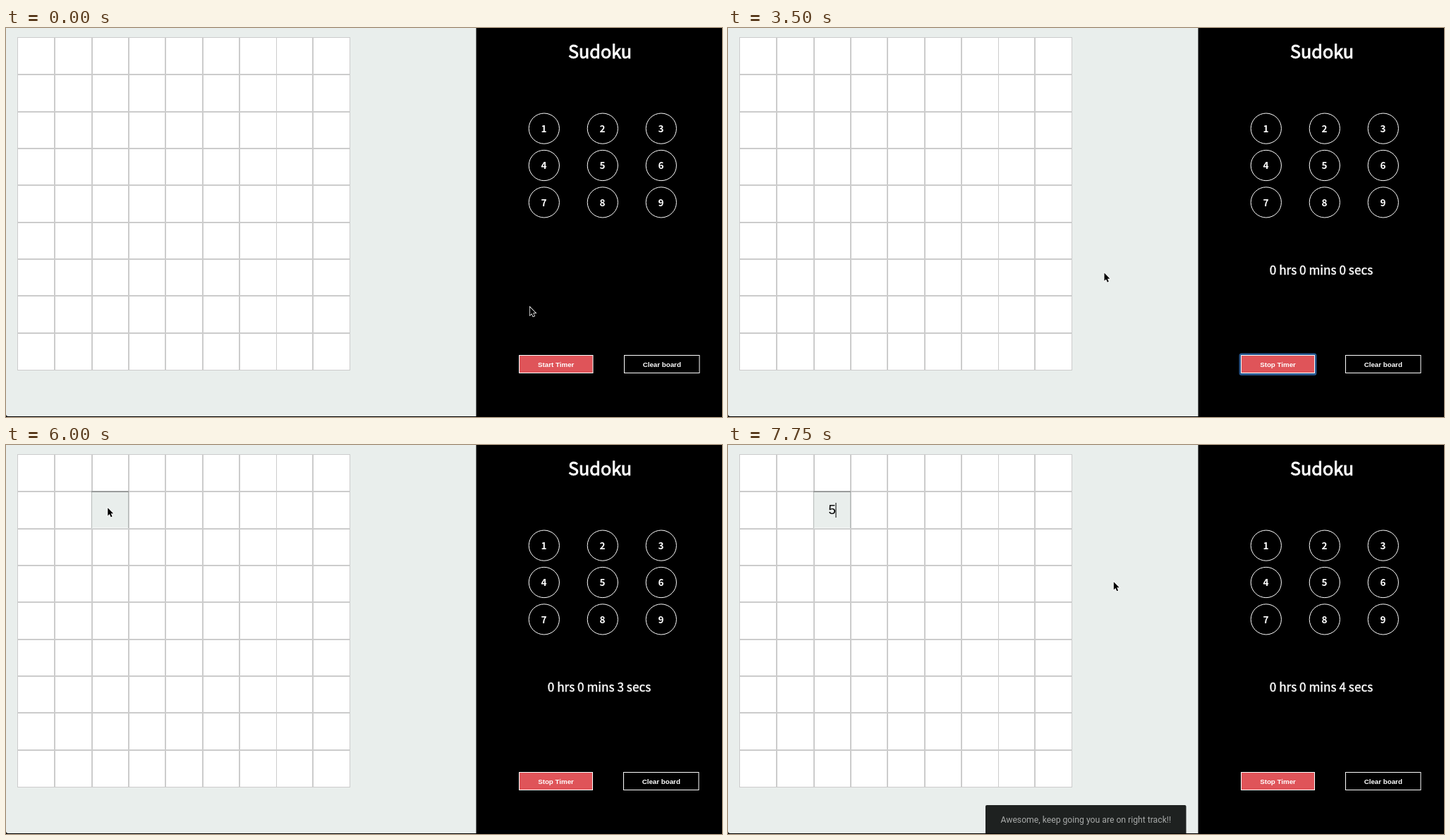
These frames come from a looping animation (1015x552 px, 8000 ms). An HTML page:

```html
<!DOCTYPE html>
<html lang="en">
<head>
<meta charset="utf-8">
<title>Sudoku</title>
<style>
  html, body { margin: 0; width: 100%; height: 100%; overflow: hidden; background: #000; }
  svg { display: block; }
  text { text-anchor: middle; fill: #fff; }
  .sans { font-family: "Noto Sans CJK JP", "Noto Sans CJK SC", "Noto Sans", sans-serif; }
  .arial { font-family: "Liberation Sans", Arial, sans-serif; }
  .title { font-size: 25.2px; stroke: #fff; stroke-width: .9; }
  .timer { font-size: 17.2px; stroke: #fff; stroke-width: .4; }
  .key { font-size: 13.6px; font-weight: 700; }
  .label { font-size: 9.75px; font-weight: 700; }
  .toast { font: 12.2px Roboto, sans-serif; fill: #a8aaa9; }
</style>
</head>
<body>
<svg id="stage" width="1015" height="552" viewBox="0 0 1015 552"></svg>
<script>
const LOOP = 8000, STEP = 250;
const PANEL = '#e9eeec', LINE = '#ccc';

const rect = (x, y, w, h, fill, extra = '') =>
  `<rect x="${x}" y="${y}" width="${w}" height="${h}" fill="${fill}" ${extra}/>`;
const text = (x, y, cls, content, id = '') =>
  `<text x="${x}" y="${y}" class="${cls}" id="${id}">${content}</text>`;
const range = n => [...Array(n).keys()];

function grid() {
  let out = rect(16, 13, 472, 473, '#fff');
  for (let k = 1; k < 9; k++) {
    const x = Math.round(17 + 52.3 * k), y = Math.round(13.8 + 52.35 * k);
    out += k === 7 ? rect(x, 13, 1, 473, LINE) : rect(x - 1, 13, 2, 473, LINE);
    out += rect(16, y - 1, 472, 2, LINE);
  }
  return out + rect(16.5, 13.5, 471, 472, 'none', `stroke="${LINE}"`);
}

function keypad() {
  return range(9).map(i => {
    const x = 762.8 + 83 * (i % 3), y = 142.6 + 52.4 * Math.floor(i / 3);
    return `<circle cx="${x}" cy="${y}" r="21.6" fill="none" stroke="#fff"/>` +
      text(x - .3, y + 5.2, 'sans key', i + 1);
  }).join('');
}

const button = (id, fill) =>
  rect(0, 464.5, 0, 25, fill, `id="${id}" stroke="#fff"`) +
  text(0, 481.3, 'arial label', '', id + 'Label');

const activeCell =
  rect(121, 66, 53, 53, PANEL) + rect(121, 117, 53, 1, '#f4f6f5') +
  rect(121, 118, 53, 1, '#d3d6d5') + rect(121, 66, 1, 52, '#b4b8b7') +
  rect(173, 66, 1, 52, '#b4b8b7') + rect(121, 65.5, 53, 1.5, '#8b8e8d');

document.getElementById('stage').innerHTML =
  rect(0, 0, 1015, 552, '#000') +
  `<path d="M0 0H666.5V551H3Q0 551 0 548Z" fill="${PANEL}"/>` +
  grid() +
  `<g id="cell">${activeCell}</g>` +
  text(147.7, 98.3, 'arial', '5', 'digit') +
  rect(0, 82, 1, 21, '#000', 'id="caret"') +
  `<g id="loading">${rect(0, 0, 666.5, 551, '#000', 'opacity=".3"')}
    <circle id="spinner" cx="423" cy="236.5" r="16" pathLength="1" fill="none"
      stroke="#0d8696" stroke-width="3" stroke-linecap="round"/></g>` +
  `<g id="toast"><path d="M365 551V513Q365 511 367 511H647.5Q649.5 511 649.5 513V551Z" fill="#1e2120"/>
    ${text(507.3, 535.7, 'toast', 'Awesome, keep going you are on right track!!')}</g>` +
  text(842, 43, 'sans title', 'Sudoku') +
  keypad() +
  text(841, 349.5, 'sans timer', '', 'timer') +
  rect(726, 463, 107, 28.5, 'none', 'id="ring" rx="2" stroke="#28588f" stroke-width="3"') +
  button('start', '#df5459') + button('clear', '#000') +
  `<path id="cursor" d="M.8 1.2V12.4L3.3 10.1L5.2 14.3L7.1 13.5L5.2 9.3H8.7Z"
    fill="#000" stroke="#fff" stroke-width="1.5" paint-order="stroke"/>`;

const el = {};
document.querySelectorAll('[id]').forEach(node => el[node.id] = node);
el.digit.setAttribute('style', 'font-size:18.5px;fill:#000');

// [time, x, y] of the pointer tip
const pointerPath = [
  [0, 742, 395], [500, 752, 438], [1000, 766, 479], [2250, 766, 479],
  [2500, 757, 478], [3000, 757, 478], [3250, 690, 440], [4000, 218, 159],
  [4250, 178, 115], [4500, 157, 94.5], [5000, 143.5, 88], [7000, 143.5, 88],
  [7250, 250, 136], [7500, 412, 182.5], [7750, 546, 193], [8000, 546, 193]
];

function pointerAt(t) {
  const i = Math.max(1, pointerPath.findIndex(p => p[0] >= t));
  const [t0, x0, y0] = pointerPath[i - 1], [t1, x1, y1] = pointerPath[i];
  const k = (t - t0) / (t1 - t0);
  return [x0 + (x1 - x0) * k, y0 + (y1 - y0) * k];
}

const clamp = v => Math.min(1, Math.max(0, v));
const within = (t, from, to = LOOP) => t >= from && t < to;
const show = (node, on) => node.setAttribute('visibility', on ? 'visible' : 'hidden');

function setButton(id, x, width, label) {
  el[id].setAttribute('x', x);
  el[id].setAttribute('width', width);
  el[id + 'Label'].setAttribute('x', x + width / 2);
  el[id + 'Label'].textContent = label;
}

function spin(seconds) {
  const grow = clamp((seconds - .25) / .75), chase = clamp((seconds - 1) / .85);
  const tail = .05 * grow + .94 * chase ** .75;
  const head = Math.min(1, tail + .65 * grow * grow * (3 - 2 * grow));
  el.spinner.setAttribute('stroke-dasharray', `${Math.max(.001, head - tail)} 2`);
  el.spinner.setAttribute('stroke-dashoffset', -tail);
  el.spinner.setAttribute('transform', `rotate(${180 * seconds} 423 236.5)`);
}

function render(t) {
  const running = t >= 3000, typed = t >= 6250;

  setButton('start', 727.5, running ? 104 : 104.5, running ? 'Stop Timer' : 'Start Timer');
  setButton('clear', running ? 875.5 : 876.5, 106.5, 'Clear board');
  show(el.ring, within(t, 3000, 5000));

  const secs = Math.floor((t - 3000) / 1000);
  el.timer.textContent = running ? `0 hrs 0 mins ${secs} secs` : '';

  show(el.cell, t >= 5000);
  show(el.digit, typed);
  show(el.caret, within(t, 5000, 5750) || within(t, 6250, 6750) || within(t, 7250));
  el.caret.setAttribute('x', typed ? 152.5 : 147.5);

  show(el.loading, within(t, 6250, 7750));
  spin(Math.max(0, t - 6250) / 1000);
  show(el.toast, t >= 7750);

  el.cursor.setAttribute('transform', `translate(${pointerAt(t)})`);
}

const begin = performance.now();
function tick() {
  const t = (performance.now() - begin) % LOOP;
  render(Math.floor(t / STEP) * STEP);
  requestAnimationFrame(tick);
}
tick();
</script>
</body>
</html>
```
